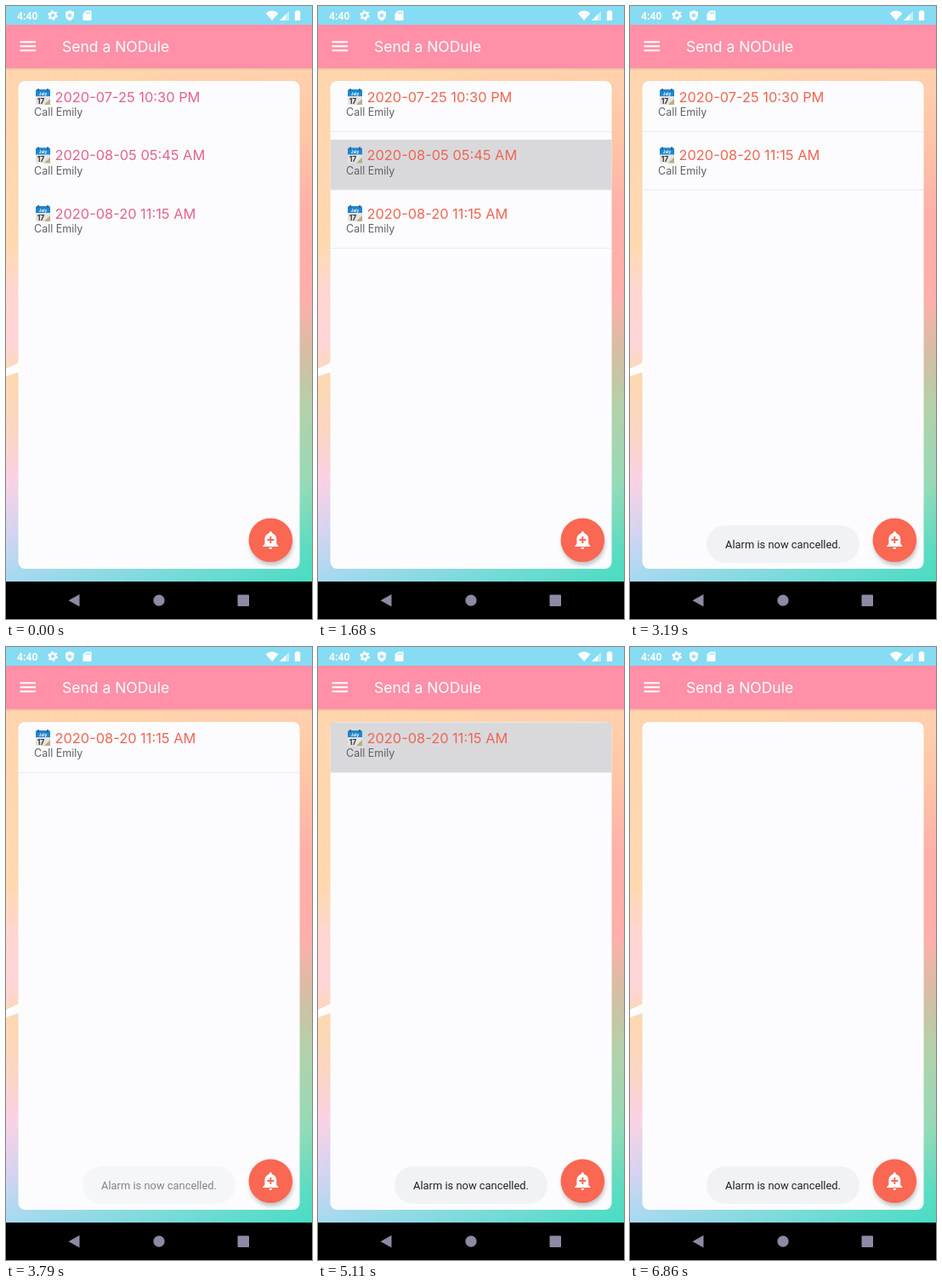
Write an HTML page that moves like this. It is 360 px wide and 720 px high and loops after 6.89 s.

```html
<!DOCTYPE html>
<html lang="en">
<head>
<meta charset="utf-8">
<title>Reminders</title>
<style>
html, body { margin: 0; width: 100%; height: 100%; overflow: hidden; background: #000; }
#stage { position: relative; width: 360px; height: 720px; overflow: hidden; }
.bg { position: absolute; inset: 0; }
.left { background: linear-gradient(#ffd6ad 80px, #ffdab0 280px, #ffd8d2 335px, #fed6d8 395px, #ffd9b2 440px, #fdd6c4 500px, #fbd2e8 560px, #d6d4f2 620px, #a8daf2 672px); }
.right {
  background: linear-gradient(#ffd0ac 80px, #ffc4a6 160px, #ffafa8 240px, #ffaeaa 340px, #d9bba2 400px, #b2d0a8 470px, #94dab6 560px, #58dcc0 640px, #4adcc2 672px);
  -webkit-mask-image: linear-gradient(90deg, transparent, #000);
  mask-image: linear-gradient(90deg, transparent, #000);
}
svg { position: absolute; left: 0; top: 0; }
text { font-family: Inter, Roboto, sans-serif; }
.roboto { font-family: Roboto, Arial, sans-serif; }
.date { font-size: 16.4px; fill: #ee6654; }
.note { font-size: 12.5px; fill: #606164; }
.start .date { fill: #e2648a; }
.start .divider { visibility: hidden; }
.fab { filter: drop-shadow(1px 4px 2px #0003); }
</style>
</head>
<body>
<div id="stage">
<div class="bg left"></div>
<div class="bg right"></div>
<svg id="art" width="360" height="720" viewBox="0 0 360 720">
  <defs>
    <g id="calendar">
      <rect x="35" y="98" width="17" height="18" rx="1.5" fill="#e4e4e2"/>
      <path d="M35 106V99.5q0-1.5 1.5-1.5h14q1.5 0 1.5 1.5V106z" fill="#1f86cf"/>
      <path d="M38 97v3M49 97v3" stroke="#37566c" stroke-width="1.5"/>
      <path d="M52 109v7h-7z" fill="#b9ad84"/>
      <text x="43.5" y="104.5" font-size="4.5" font-weight="700" text-anchor="middle" fill="#fff">July</text>
      <text x="41" y="114.5" font-size="8.5" font-weight="700" text-anchor="middle" fill="#333">17</text>
    </g>
  </defs>

  <path d="M0 426L15 419V430L0 435z" fill="#fff"/>

  <!-- Status bar and title bar -->
  <rect y="73" width="360" height="2" fill="#0001"/>
  <rect width="360" height="22" fill="#86dcf3"/>
  <rect y="22" width="360" height="51" fill="#ff90a8"/>
  <g fill="#fff">
    <text class="roboto" x="13" y="15.5" font-size="12.2" font-weight="600">4:40</text>
    <circle cx="55" cy="11" r="3.3" fill="none" stroke="#fff" stroke-width="2.4"/>
    <circle cx="55" cy="11" r="5" fill="none" stroke="#fff" stroke-width="1.8" stroke-dasharray="2.4 2.836"/>
    <path d="M75 5l5 2v4q0 4-5 6.5q-5-2.5-5-6.5V7z"/>
    <path d="M75 8l.9 2 2.1.2-1.6 1.4.5 2.1-1.9-1.1-1.9 1.1.5-2.1-1.6-1.4 2.1-.2z" fill="#86dcf3"/>
    <path d="M94 5.5h5.5q1 0 1 1v9.5q0 1-1 1h-8q-1 0-1-1V9z"/>
    <path d="M94.5 7v2.5M96.5 7v2.5M98.5 7v2.5" stroke="#86dcf3"/>
    <path d="M305.5 8.5q7.500-6 15 0L313 17z"/>
    <path d="M333 6v11h-11z" opacity=".5"/>
    <path d="M329 10v7h-7z"/>
    <path d="M341.5 5h3v1.2h1.7V17h-6.4V6.2h1.7z"/>
    <path d="M16.5 41.3h18.5v2H16.5zM16.5 46.300h18.5v2H16.5zM16.5 51.300h18.5v2H16.5z"/>
    <text x="66" y="54" font-size="17.5">Send a NODule</text>
  </g>

  <rect x="14.5" y="88" width="331" height="573" rx="8" fill="#fcfcfe"/>
  <g id="rows"></g>

  <g id="toast">
    <rect x="90" y="610" width="180" height="44" rx="22" fill="#f1f2f3"/>
    <text class="roboto" x="180" y="636.5" font-size="12.9" text-anchor="middle" fill="#222">Alarm is now cancelled.</text>
  </g>

  <circle class="fab" cx="311.3" cy="627.3" r="25.8" fill="#fa6753"/>
  <path transform="translate(299.3 615)" fill="#fff" d="M10 21a2 2 0 0 0 4 0zM18.9 16.8V11c0-3.2-2.3-6-5.3-6.7v-.7a1.6 1.6 0 0 0-3.2 0v.7C7.4 5 5.1 7.800 5.1 11v5.800L3 18.9V20h18v-1.1zM16 13h-3v3h-2v-3H8v-2h3V8h2v3h3z"/>

  <!-- Navigation bar -->
  <rect y="676" width="360" height="44"/>
  <g fill="#8c8ba3">
    <path d="M73.5 698.2L86.5 691v14.5z"/>
    <circle cx="180" cy="698.2" r="6.6"/>
    <rect x="272.5" y="691.5" width="13.500" height="13.5" rx="1"/>
  </g>
</svg>
</div>
<script>
const LOOP = 6890, PITCH = 68.5;
const alarms = [
  { date: "2020-07-25 10:30 PM", press: 3300, gone: 3750 },
  { date: "2020-08-05 05:45 AM", press: 1450, gone: 2000 },
  { date: "2020-08-20 11:15 AM", press: 4800, gone: 5250 }
];
const toasts = [[2000, 3900], [3920, 5810], [5850, 8000]];

const $ = id => document.getElementById(id);
const clamp = x => Math.max(0, Math.min(1, x));

$("rows").innerHTML = alarms.map(a => `<g>
  <rect class="press" x="14.5" y="88.5" width="331" height="59" fill="#d9d9dc"/>
  <rect class="divider" x="14.5" y="147" width="331" height="1" fill="#e8ecf0"/>
  <use href="#calendar"/>
  <text class="date" x="57.5" y="112.7">${a.date}</text>
  <text class="note" x="33" y="129.3">Call Emily</text>
</g>`).join("");
const rows = [...$("rows").children];

function draw(t) {
  $("art").classList.toggle("start", t < 20);
  let slot = 0;
  alarms.forEach((a, i) => {
    const shown = t < a.gone;
    rows[i].style.display = shown ? "" : "none";
    rows[i].setAttribute("transform", `translate(0 ${slot * PITCH})`);
    rows[i].firstElementChild.style.opacity = clamp((t - a.press) / 150);
    if (shown) slot++;
  });
  $("toast").style.opacity = Math.max(...toasts.map(([from, to]) =>
    Math.min(clamp((t - from) / 200), clamp((to - t) / 200))));
}

const begin = performance.now();
function tick() {
  draw((performance.now() - begin) % LOOP);
  requestAnimationFrame(tick);
}
tick();
</script>
</body>
</html>
```
